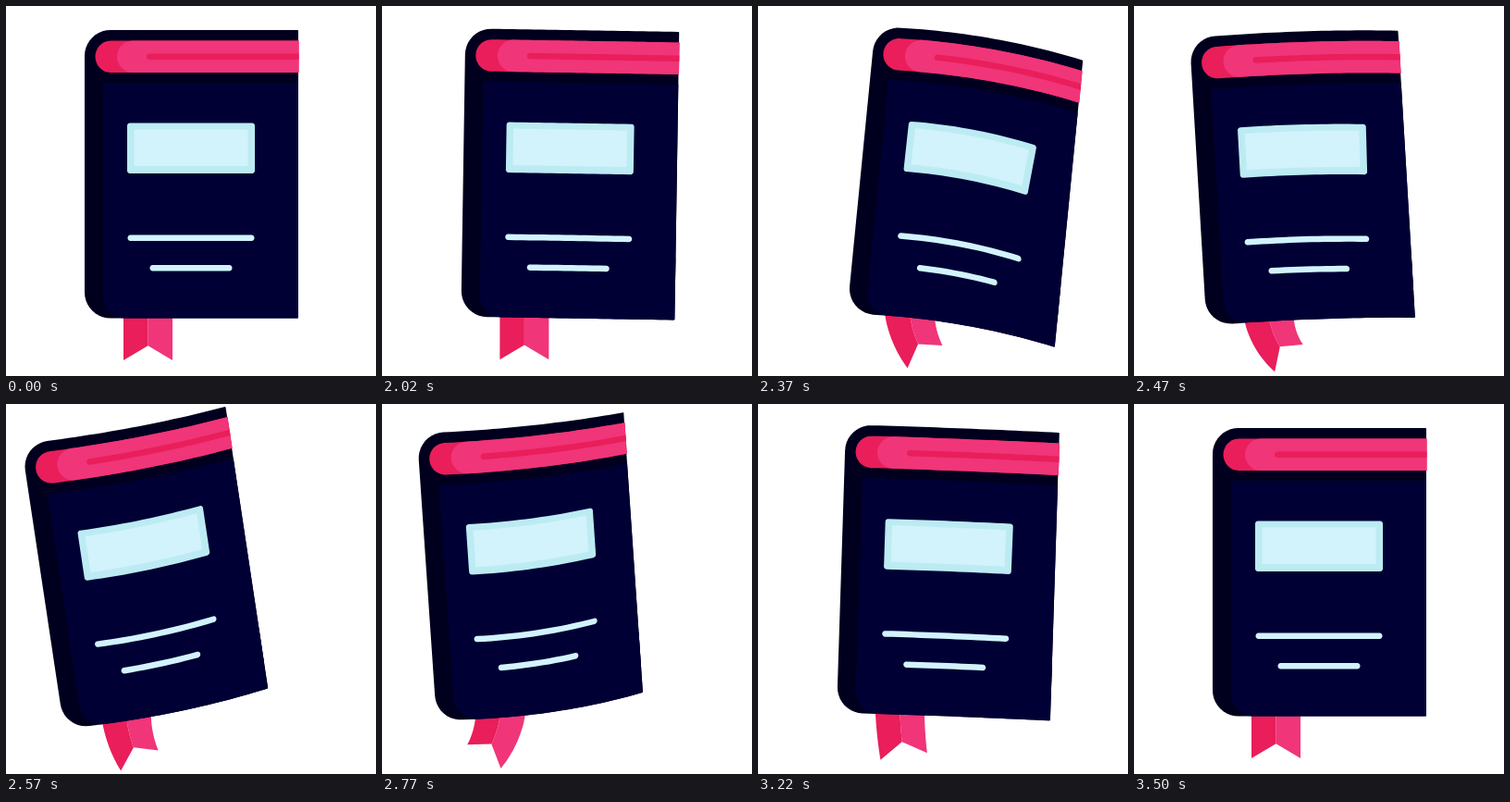
Animation of 400x400 px, one loop 3520 ms. Source, as an HTML page with a canvas:

```html
<!DOCTYPE html>
<html lang="en">
<head>
<meta charset="utf-8">
<title>Book</title>
<style>
html, body { margin: 0; width: 100%; height: 100%; overflow: hidden; background: #fff; }
canvas { display: block; width: 400px; height: 400px; }
</style>
</head>
<body>
<canvas id="stage" width="400" height="400"></canvas>
<script>
const ctx = document.getElementById('stage').getContext('2d');
const LOOP = 3520, START = 2020, STEP = 25;
const NAVY = '#000034', DARK = '#00001e', PINK = '#f03579', ROSE = '#e91e5a',
      ICE = '#d2f3fb', FROST = '#bcebf3';
const rad = deg => deg * Math.PI / 180;

// Swings from turning point to turning point [time, value] with sine easing
function sway(t, ...turns) {
  let [at, value] = turns[0];
  for (const [next, goal] of turns.slice(1)) {
    const k = Math.min(1, Math.max(0, (t - at) / (next - at)));
    value += (goal - value) * (1 - Math.cos(Math.PI * k)) / 2;
    if (k < 1) break;
    at = next;
  }
  return value;
}

// The lean leads; slide, bend and ribbon follow it with a lag
function poseAt(time) {
  const t = time < START ? 0 : START + Math.floor((time - START) / STEP) * STEP;
  return {
    lean: rad(sway(t, [1960, 0], [2270, 10], [2580, -8.6], [3020, 3.3], [3450, 0])),
    slide: sway(t, [2000, 0], [2235, 22], [2680, -31], [3030, 0]),
    drop: sway(t, [2000, 0], [2340, 5], [2580, -2.5], [2970, -1.7], [3300, 0]),
    bend: sway(t, [2000, 0], [2350, 16], [2660, -16], [3030, 3], [3400, 0]),
    twist: sway(t, [2400, 0], [2770, -8], [3100, 0]),
    pull: sway(t, [2000, 0], [2680, -7], [3200, 0]),
    ribbon: sway(t, [2020, 0], [2100, 12], [2480, -40], [2790, 33], [3200, -8], [3350, 3], [3480, 0])
  };
}

// Bends a point of the flat book, then leans it around the middle of the bottom edge.
// Printed parts bend more; the label also keeps its corners square.
function warp(pose, x, y, kind) {
  const u = Math.max(0, (x - 113) / 203), v = (y - 26) / 311;
  const bend = (pose.bend + pose.twist * (v - 0.5)) * (kind ? 1.5 : 1);
  let px = x - 200.5;
  const py = y - 337 + bend * (1.5 * u * u - 0.5 * u);
  if (kind === 'label') px -= Math.max(0, bend) * u / 203 * (y - 153.5);
  else px += pose.pull * u ** 3;
  const c = Math.cos(pose.lean), s = Math.sin(pose.lean);
  return [200.5 + pose.slide + px * c - py * s, 337 + pose.drop + px * s + py * c];
}

function fill(points, color) {
  ctx.fillStyle = color;
  ctx.beginPath();
  points.forEach(p => ctx.lineTo(...p));
  ctx.closePath();
  ctx.fill();
}

// Rounded box, one radius for each side, cut into short pieces so it can bend
function box(pose, color, x0, y0, x1, y1, rl, rr, kind) {
  const raw = [];
  const corner = (x, y, r, from) => {
    for (let i = 0; i <= 10; i++) {
      const a = rad(from + i * 9);
      raw.push([x + r * Math.cos(a), y + r * Math.sin(a)]);
    }
  };
  corner(x0 + rl, y0 + rl, rl, 180);
  corner(x1 - rr, y0 + rr, rr, 270);
  corner(x1 - rr, y1 - rr, rr, 0);
  corner(x0 + rl, y1 - rl, rl, 90);
  const points = [];
  raw.forEach(([x, y], i) => {
    const [nx, ny] = raw[(i + 1) % raw.length];
    const n = Math.ceil(Math.hypot(nx - x, ny - y) / 8);
    for (let j = 0; j < n; j++) {
      points.push(warp(pose, x + (nx - x) * j / n, y + (ny - y) * j / n, kind));
    }
  });
  fill(points, color);
}

function ribbon(pose) {
  const swing = pose.ribbon, len = 46, hidden = 8, n = 24;
  const step = (len + hidden) / n;
  const angle = k => rad(swing * (0.3 + 0.8 * k));
  const mid = [], left = [], right = [];
  let [x, y] = warp(pose, 153.5, 337);
  x += hidden * Math.sin(angle(0));
  y -= hidden * Math.cos(angle(0));
  for (let i = 0; i <= n; i++) {
    const s = i * step - hidden, k = Math.max(0, s / len), a = angle(k);
    const half = 26.5 * (1 - 0.005 * Math.abs(swing) * k);
    const dx = half * Math.cos(a), dy = half * Math.sin(a);
    left.push([x - dx, y - dy]);
    right.push([x + dx, y + dy]);
    if (s <= len - 14.5) mid.unshift([x, y]);
    x -= step * Math.sin(a);
    y += step * Math.cos(a);
  }
  fill([...right, ...mid], PINK);
  fill([...left, ...mid], ROSE);
}

function draw(time) {
  const pose = poseAt(time);
  const part = (...args) => box(pose, ...args);
  ctx.clearRect(0, 0, 400, 400);
  ribbon(pose);
  part(DARK, 85, 26, 316, 337.5, 28, 1);
  part(NAVY, 105, 83, 316, 310, 0, 0);
  part(NAVY, 105, 270, 316, 337.5, 24, 1);
  part(ROSE, 96.5, 37.5, 316.5, 72, 17.2, 0);
  part(PINK, 120, 37.5, 316.5, 72, 17.2, 0);
  part(ROSE, 152, 51.5, 316.5, 58, 3.2, 0);
  part(FROST, 131, 126.5, 269, 181, 3, 3, 'label');
  part(ICE, 138.5, 133.5, 261.5, 173, 0, 0, 'label');
  part(ICE, 131.5, 247.5, 268.5, 254, 3.2, 3.2, 'line');
  part(ICE, 155.5, 280, 244.5, 286.5, 3.2, 3.2, 'line');
}

const begin = performance.now();
function tick() {
  draw((performance.now() - begin) % LOOP);
  requestAnimationFrame(tick);
}
tick();
</script>
</body>
</html>
```
